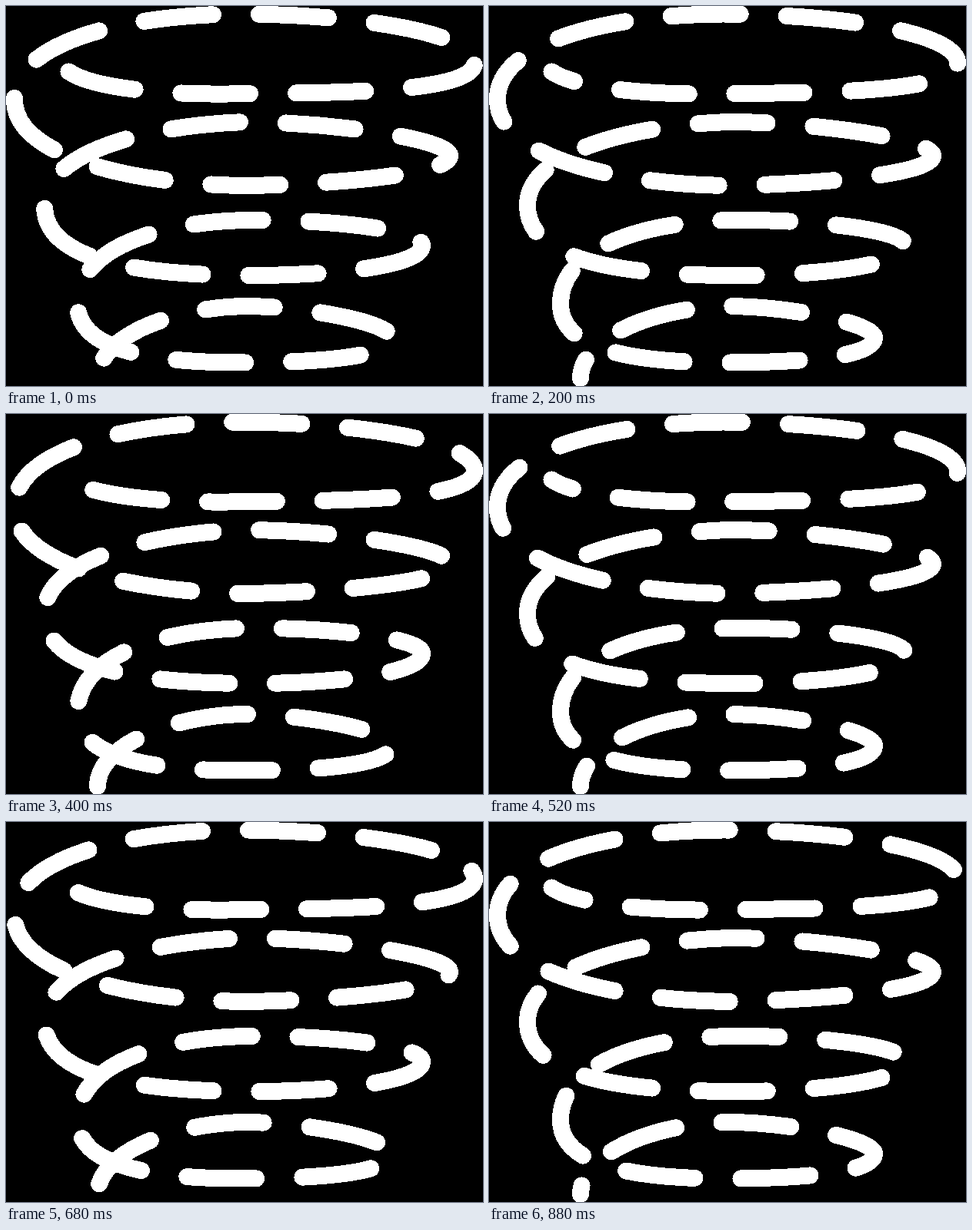
Write an HTML page that moves like this. It is 620x495 px and loops after 920 ms.

```html
<!DOCTYPE html>
<html lang="en">
<head>
<meta charset="utf-8">
<title>Spiral of moving dashes</title>
<style>
  html, body { margin: 0; width: 100%; height: 100%; overflow: hidden; background: #000; }
  svg { display: block; width: 100%; height: 100%; }
  path {
    fill: none; stroke: #fff; stroke-width: 22; stroke-linecap: round;
    stroke-dasharray: 90 60; shape-rendering: crispEdges;
  }
</style>
</head>
<body>
<svg viewBox="0 0 620 495">
  <path id="spiral" pathLength="4318" d="
    M81.5 85.5
    C116 109 215 115.3 290 114.5
    C390 112.5 609 117 609 74
    C609 34 450 10.5 304 10.5
    C150 11 11 49 11 121
    C9.5 192 150 232 311 234
    C400 233 577 222 577 195
    C577 173 420 151 312 151
    C185 155 50 190 50 260
    C50 327 155 351.5 325 351
    C415 351 541 340 541 312
    C541 290 410 278 320 279
    C215 279 93 310 93 388
    C93 443 172 464.5 305 464.5
    C395 464.5 501 459 501 432
    C501 413 390 391 310 391
    C215 392.5 119 432 119 485"/>
</svg>
<script>
  const LOOP = 920;   // ms
  const STEP = 40;    // ms per pose
  const SHIFT = 18.47; // travel per pose along the path
  const spiral = document.getElementById('spiral');
  const start = performance.now();

  function draw(ms) {
    const pose = Math.floor((ms % LOOP) / STEP);
    spiral.style.strokeDashoffset = -pose * SHIFT;
  }

  function tick() {
    draw(performance.now() - start);
    requestAnimationFrame(tick);
  }

  draw(0);
  requestAnimationFrame(tick);
</script>
</body>
</html>
```
